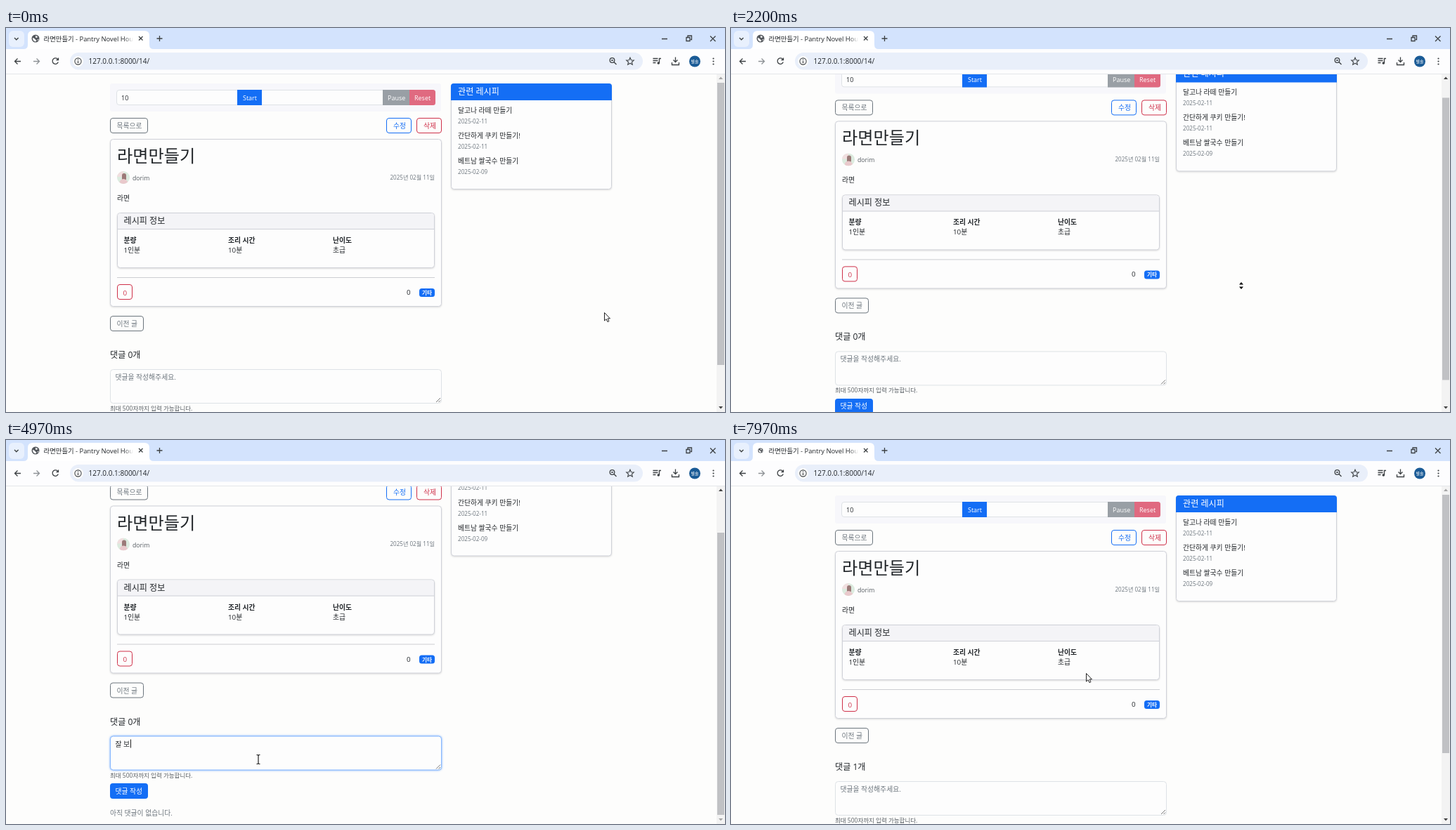
Recreate the animation shown at these times as an HTML page. Size 1023 by 547 pixels, loop 8000 ms.

```html
<!DOCTYPE html>
<html lang="ko">
<head>
<meta charset="utf-8">
<title>라면만들기</title>
<style>
  html, body { margin: 0; width: 100%; height: 100%; overflow: hidden; background: #fdfdfc; }
  svg { display: block; }
  text { font: 9.8px "Open Sans", "Noto Sans CJK KR", sans-serif; fill: #212529; white-space: pre; }
  .lat { font-size: 9px; }
  .head { font-size: 12.1px; }
  .date { font-size: 8.1px; fill: #6c757d; }
  .b { font-weight: 700; }
  text.gray { fill: #6c757d; }
  text.blue { fill: #146ef5; }
  text.red { fill: #cf3049; }
  text.white { fill: #fff; }
  .card { fill: #fdfdfd; stroke: #cfd1d8; filter: drop-shadow(0 1px 1px #0002); }
  .box { fill: #fdfdfd; stroke: #dee2e6; }
  .line { fill: none; stroke: #6c757d; }
  .line.blue { stroke: #146ef5; }
  .line.red { stroke: #cf3049; }
  .fill { fill: #146ef5; }
  .icon { fill: none; stroke: #3c4043; stroke-width: 1.3; }
  .solid { fill: #3c4043; }
</style>
</head>
<body>
<svg width="1023" height="547" viewBox="0 0 1023 547">
  <defs>
    <linearGradient id="fade"><stop stop-color="#fff" stop-opacity="0"/><stop offset="1" stop-color="#fff"/></linearGradient>
    <clipPath id="round"><circle cx="167" cy="213" r="9"/></clipPath>
  </defs>
  <rect width="1023" height="547" fill="#fdfdfc"/>

  <g id="page">
    <!-- timer -->
    <rect x="148" y="79" width="471" height="40" rx="3" fill="#f7f7fb"/>
    <rect class="box" x="157.500" y="88.500" width="453" height="21" rx="3.500"/>
    <path class="fill" d="M329 88h35v22h-35z"/>
    <path fill="#999fa5" d="M536 88h38v22h-38z"/>
    <path fill="#e06a80" d="M574 88h33.500q3.500 0 3.500 3.500v15q0 3.500-3.500 3.500H574z"/>
    <text class="lat" x="164" y="103">10</text>
    <text class="lat white" x="337" y="103">Start</text>
    <text class="lat white" x="543" y="103">Pause</text>
    <text class="lat white" x="581" y="103">Reset</text>

    <!-- actions -->
    <rect class="line" x="148.500" y="128.500" width="53" height="21" rx="3.500"/>
    <text class="gray" x="157.500" y="142.500">목록으로</text>
    <rect class="line blue" x="541.500" y="128.500" width="35" height="21" rx="3.500"/>
    <text class="blue" x="551" y="142.500">수정</text>
    <rect class="line red" x="584.500" y="128.500" width="35" height="21" rx="3.500"/>
    <text class="red" x="594" y="142.500">삭제</text>

    <!-- recipe -->
    <rect class="card" x="148.500" y="158.500" width="471" height="238" rx="4"/>
    <text x="158" y="191" style="font-size:24.200px">라면만들기</text>
    <g clip-path="url(#round)">
      <path fill="#dcebdf" d="M158 204h18v18h-18z"/>
      <path fill="#f1dfe0" d="M158 204h9v8h-9z"/>
      <path fill="#9b7a78" d="M165 216v-6a3 3 0 0 1 6 0v6z"/>
      <path fill="#e9c9cc" d="M161 222q1-7 6-7t7 7z"/>
    </g>
    <text x="180" y="217" style="font-size:8.700px;fill:#555b61">dorim</text>
    <text class="date" x="610" y="215.500" text-anchor="end">2025년 02월 11일</text>
    <text x="158" y="246">라면</text>
    <rect class="card" x="158.500" y="263.500" width="451" height="78" rx="4"/>
    <path fill="#f4f4f7" d="M159 287v-19q0-4 4-4h442q4 0 4 4v19z"/>
    <path stroke="#cfd1d8" d="M159 286.500h450"/>
    <text class="head" x="167.500" y="279">레시피 정보</text>
    <text class="b" x="167.500" y="306">분량</text><text x="167.500" y="320">1인분</text>
    <text class="b" x="316" y="306">조리 시간</text><text x="316" y="320">10분</text>
    <text class="b" x="465" y="306">난이도</text><text x="465" y="320">초급</text>
    <path stroke="#cdced2" d="M158 355.500h452"/>
    <rect class="line red" x="158.500" y="365.500" width="21" height="21" rx="3.500"/>
    <text class="red" x="166.500" y="380.500">0</text>
    <text x="570" y="380">0</text>
    <rect class="fill" x="588" y="371" width="22" height="12" rx="3.500"/>
    <text class="b white" x="592" y="380" style="font-size:7.600px">기타</text>
    <rect class="line" x="148.500" y="410.500" width="47" height="21" rx="3.500"/>
    <text class="gray" x="157.500" y="425">이전 글</text>

    <!-- comments -->
    <text class="head" x="148" y="470" id="count"></text>
    <rect class="box" id="area" x="148.500" y="486.500" width="471" height="48" rx="4"/>
    <path stroke="#777" d="M612 533l6-6M615.500 533l2.500-2.500"/>
    <text id="typed" x="155.500" y="501"></text>
    <path id="caret" stroke="#222" d="M.5 491v12"/>
    <text x="148" y="545" style="font-size:8.500px;fill:#555b61">최대 500자까지 입력 가능합니다.</text>
    <rect class="fill" id="send" x="148" y="553.500" width="54" height="22" rx="4"/>
    <text class="white" x="155.500" y="568">댓글 작성</text>
    <text class="gray" x="148" y="599.500" id="empty">아직 댓글이 없습니다.</text>

    <!-- related -->
    <rect class="card" x="633.500" y="79.500" width="228" height="150" rx="4"/>
    <path class="fill" d="M633 103V83q0-4 4-4h221q4 0 4 4v20z"/>
    <text class="head white" x="643" y="95">관련 레시피</text>
    <text x="643" y="121">달고나 라떼 만들기</text><text class="date" x="643" y="135.500">2025-02-11</text>
    <text x="643" y="157">간단하게 쿠키 만들기!</text><text class="date" x="643" y="172">2025-02-11</text>
    <text x="643" y="193">베트남 쌀국수 만들기</text><text class="date" x="643" y="208">2025-02-09</text>
  </g>

  <!-- scrollbar -->
  <path fill="#f3f3f3" d="M1011 66h12v481h-12z"/>
  <rect id="thumb" x="1012" width="10" fill="#c0c1c4"/>
  <path id="up" d="M1014 73h6l-3-3.500z"/>
  <path id="down" d="M1014 539h6l-3 3.500z"/>

  <!-- tab strip -->
  <path fill="#d3e3fd" d="M0 0h1023v40H0z"/>
  <rect x="4" y="4" width="22" height="23" rx="6" fill="#e8f0fd"/>
  <path class="icon" d="M12 14l2.800 2.800 2.800-2.800"/>
  <path fill="#fff" d="M25 30q6 0 6-6V11q0-7 7-7h159q7 0 7 7v13q0 6 6 6z"/>
  <g id="globe">
    <circle r="5.500" fill="#55595e"/>
    <path fill="#fff" d="M-4-1q2 0 3 1.500t2 1.500-1 2.500q-4-1-4-5.500zM0-4l3 1-1 2-2-.5zM3 1l1.500 0-1.500 2.500z"/>
  </g>
  <text x="53.500" y="19" style="font-size:9.400px">라면만들기 - Pantry Novel House</text>
  <path fill="url(#fade)" d="M168 8h13v15h-13z"/>
  <path fill="#fff" d="M180.500 8H203v15h-22.500z"/>
  <path class="icon" d="M189 12l5.500 5.500m0-5.500L189 17.500M214.500 15h8m-4-4v8"/>
  <path class="icon" stroke-width="1" d="M933 15.500h8M968 13.500h5v5h-5zM970 13v-2h5.500v5.500H974M1002 11.500l7.500 7.500m0-7.500l-7.500 7.500"/>

  <!-- toolbar -->
  <path fill="#fdfdfe" d="M0 30h1023v36H0z"/>
  <path stroke="#e4e6ea" d="M0 65.500h1023"/>
  <path class="icon" d="M21 47.500h-8.500m4-4l-4 4 4 4"/>
  <path class="icon" style="stroke:#8e9296" d="M39 47.500h8.500m-4-4l4 4-4 4"/>
  <path class="icon" d="M74 45a4.200 4.200 0 1 0 .3 3.500M74.500 42.500v3h-3"/>
  <rect x="91" y="35" width="815" height="24.500" rx="12.200" fill="#e9effa"/>
  <circle cx="102.500" cy="47.500" r="7.500" fill="#fff"/>
  <circle class="icon" cx="102.500" cy="47.500" r="4.600" style="stroke-width:1.100"/>
  <path class="icon" d="M102.500 47v3M102.500 44.700v1.200"/>
  <text x="117.500" y="51" style="font-size:10px">127.0.0.1:8000/14/</text>
  <circle class="icon" cx="862.500" cy="46" r="3.300"/>
  <path class="icon" d="M865 48.500l3.500 3.500M861 46h3"/>
  <path class="icon" style="stroke-width:1.100" d="M888 42.200l1.500 3.500 3.800.3-2.900 2.500.9 3.700-3.300-2-3.300 2 .9-3.700-2.900-2.500 3.800-.3z"/>
  <path class="icon" d="M920.500 43.500h7M920.500 46.500h7M920.500 49.500h4M929.500 50v-6.500h2.500"/>
  <circle class="solid" cx="928.300" cy="50" r="1.800"/>
  <path class="icon" d="M952.500 41.500v7m-3-3l3 3 3-3M947.500 49v3.500h10V49"/>
  <circle cx="980" cy="47.500" r="8" fill="#1a5b96"/>
  <text class="white" x="980" y="49.800" text-anchor="middle" style="font-size:6px">별솔</text>
  <g class="solid"><circle cx="1006.500" cy="43.500" r="1.100"/><circle cx="1006.500" cy="47.500" r="1.100"/><circle cx="1006.500" cy="51.500" r="1.100"/></g>

  <!-- pointer shapes, hot spot at 0,0 -->
  <g id="pointer">
    <path id="arrow" fill="#fff" stroke="#222" d="M.5.5v11.500l2.600-2.400 1.900 4 1.900-.9-1.800-3.800H8.500z"/>
    <path id="beam" fill="none" stroke="#222" stroke-width="1.200" d="M-2.500-6.500H-1l1 1 1-1h1.500M-2.500 6.500H-1l1-1 1 1h1.500M0-5.500v11"/>
    <path id="hand" fill="#fff" stroke="#222" d="M-1 7V1q0-1.500 1-1.500T1 1v4l5 1q1.500.5 1.500 2v2.500L6 14H0L-4 8.500Q-4 6-1 8z"/>
    <path id="pan" d="M-3-1.500h6L0-5zM-3 1.500h6L0 5z"/>
  </g>
</svg>

<script>
const $ = id => document.getElementById(id);
const LOOP = 8000, MAX_SCROLL = 64.5, FOCUS = 3450, RELOAD = 7450;

// time, x, y
const path = [
  [0, 851, 405], [1160, 759, 327], [1600, 726, 367], [2450, 726, 367], [2950, 360, 457],
  [3350, 359, 455], [6300, 359, 455], [6950, 176, 500], [RELOAD, 176, 500], [7970, 505, 332], [8000, 507, 331]
];
const typing = [
  [3700, 'ㅈ'], [3850, '재'], [4200, '자'], [4350, '잘'], [4500, '잘 '], [4700, '잘 ㅂ'], [4870, '잘 보'],
  [5040, '잘 복'], [5110, '잘 보고'], [5180, '잘 보고 '], [5250, '잘 보고 ㄱ'], [5310, '잘 보고 가'],
  [5370, '잘 보고 갑'], [5430, '잘 보고 갑ㄴ'], [5490, '잘 보고 갑니'], [5550, '잘 보고 갑닏'], [5600, '잘 보고 갑니다']
];

function pointerAt(t) {
  const i = path.findIndex(k => k[0] > t);
  const [a, b] = [path[i - 1], path[i]];
  const p = (t - a[0]) / (b[0] - a[0]), e = p * p * (3 - 2 * p);
  return [a[1] + (b[1] - a[1]) * e, a[2] + (b[2] - a[2]) * e];
}

function scrollAt(t) {
  if (t >= RELOAD) return 0;
  const p = Math.min(1, Math.max(0, (t - 1700) / 770));
  return MAX_SCROLL * p ** 2.15;
}

const show = (id, on) => $(id).style.display = on ? '' : 'none';
const inside = (x, y, l, t, r, b) => x >= l && x <= r && y >= t && y <= b;

function drawPage(t, scroll) {
  const reloaded = t >= RELOAD, focused = t >= FOCUS && !reloaded;
  $('page').setAttribute('transform', `translate(0 ${-scroll})`);
  $('count').textContent = `댓글 ${reloaded ? 1 : 0}개`;
  show('empty', !reloaded);
  $('globe').setAttribute('transform', `translate(42 15) scale(${reloaded ? 0.65 : 1})`);

  $('area').style.cssText = focused ? 'stroke:#86b7fe;filter:drop-shadow(0 0 1.5px #0d6efd99)' : '';
  const step = focused && typing.findLast(k => k[0] <= t);
  const typed = $('typed');
  typed.textContent = step ? step[1] : '댓글을 작성해주세요.';
  typed.setAttribute('class', step ? '' : 'gray');
  const caretX = 156 + (step ? Math.round(typed.getComputedTextLength()) : 0);
  $('caret').setAttribute('transform', `translate(${caretX} 0)`);
  show('caret', focused && t < 7150 && !(t >= 6100 && t < 6630));

  const height = reloaded ? 368 : 402;
  $('thumb').setAttribute('height', height);
  $('thumb').setAttribute('y', 78 + scroll * 0.837);
  $('up').setAttribute('fill', scroll > 0 ? '#444' : '#a5a5a5');
  $('down').setAttribute('fill', scroll < MAX_SCROLL ? '#444' : '#a5a5a5');
}

function drawPointer(t, scroll) {
  const [x, y] = pointerAt(t);
  const onSend = inside(x, y + scroll, 148, 553, 202, 576);
  const shape = t >= 1650 && t < 2450 ? 'pan'
    : onSend ? 'hand'
    : inside(x, y + scroll, 148, 486, 619, 535) ? 'beam' : 'arrow';
  for (const id of ['arrow', 'beam', 'hand', 'pan']) show(id, id === shape);
  $('pointer').setAttribute('transform', `translate(${x} ${y})`);
  $('send').style.fill = onSend ? '#0b5ed7' : '';
}

const start = performance.now();
function frame() {
  const t = (performance.now() - start) % LOOP;
  const scroll = scrollAt(t);
  drawPage(t, scroll);
  drawPointer(t, scroll);
  requestAnimationFrame(frame);
}
frame();
</script>
</body>
</html>
```
